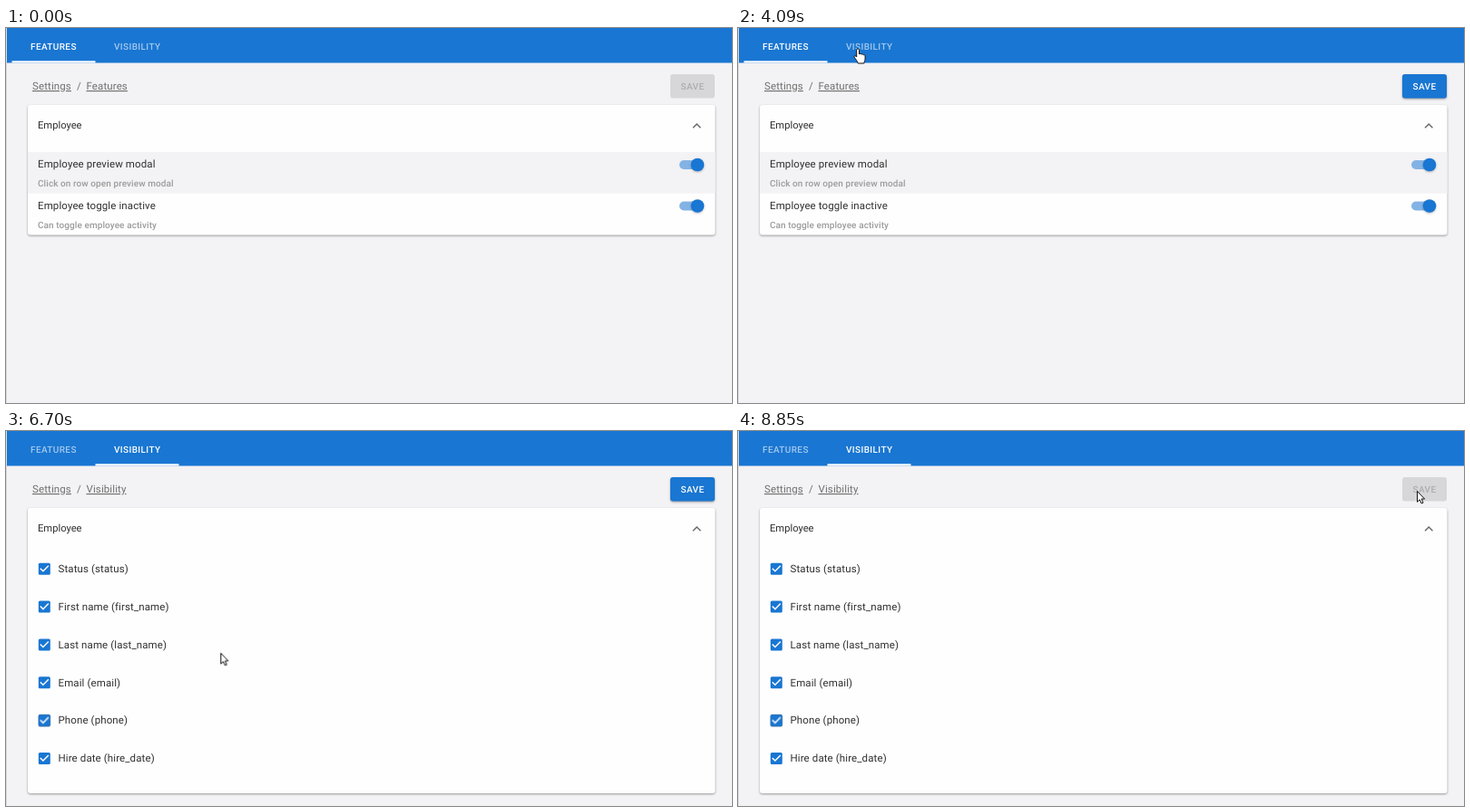
An HTML page for the animation above (9060 ms loop, 800 by 414 pixels).

```html
<!DOCTYPE html>
<html lang="en">
<head>
<meta charset="utf-8">
<title>Settings</title>
<style>
  html, body { margin: 0; width: 100%; height: 100%; overflow: hidden; background: #f3f2f4; }
  svg { display: block; width: 800px; height: 414px; font: 400 11.5px Roboto, sans-serif; letter-spacing: .11px; fill: #303030; text-rendering: geometricPrecision; }
  .blue { fill: #1976d2; }
  .card { fill: #fefefe; filter: drop-shadow(0 1px 1px rgba(0, 0, 0, .38)); }
  .head { font-size: 11.2px; letter-spacing: 0; }
  .sub { font-size: 10px; font-weight: 500; letter-spacing: .08px; fill: #9c9c9c; }
  .crumb { fill: #707070; }
  .link { text-decoration: underline; }
  .caps { font-size: 10px; font-weight: 500; letter-spacing: .38px; fill: #fff; }
  .line { fill: none; stroke: #6a6a6a; stroke-width: 1.45; }
  .tick { fill: none; stroke: #fff; stroke-width: 1.45; }
  .track { fill: #83b3e5; }
  .pointer { fill: #fff; stroke: #111; stroke-width: 1; stroke-linejoin: round; }

  .anim { animation: 9060ms linear infinite both; }
  #features { animation-name: leave; animation-timing-function: step-end; }
  #visibility { animation-name: enter; animation-timing-function: step-end; }
  #tabA { animation-name: dim; }
  #tabB { animation-name: light; }
  #slider { animation-name: slide; }
  #save { animation-name: save; }
  #thumb { animation-name: thumb; }
  #track { animation-name: track; }
  #phone { animation-name: check; animation-timing-function: step-end; }
  #cursor { animation-name: move; }
  #arrow { animation-name: arrow; animation-timing-function: step-end; }
  #hand { animation-name: hand; animation-timing-function: step-end; }

  @keyframes leave { 0% { opacity: 1; } 46.69%, 100% { opacity: 0; } }
  @keyframes enter { 0% { opacity: 0; } 46.69%, 100% { opacity: 1; } }
  @keyframes check { 0% { opacity: 0; } 68.21%, 100% { opacity: 1; } }
  @keyframes dim { 0%, 46.4% { opacity: 1; } 48.5%, 100% { opacity: .6; } }
  @keyframes light { 0%, 46.4% { opacity: .6; } 48.5%, 100% { opacity: 1; } }
  @keyframes slide {
    0%, 46.4% { transform: none; animation-timing-function: cubic-bezier(.25, .8, .5, 1); }
    49.7%, 100% { transform: translateX(92px); }
  }
  @keyframes save {
    0%, 24.39% { opacity: 0; }
    26.6%, 88.3% { opacity: 1; }
    90.5%, 100% { opacity: 0; }
  }
  @keyframes thumb {
    0%, 24.39%, 28.48%, 100% { transform: none; fill: #1976d2; }
    26.05%, 26.82% { transform: translateX(-13px); fill: #fff; }
  }
  @keyframes track {
    0%, 24.39%, 28.48%, 100% { fill: #83b3e5; }
    26.05%, 26.82% { fill: #9e9e9e; }
  }
  @keyframes move {
    0%, 9.38% { transform: translate(-12px, 338px); animation-timing-function: cubic-bezier(.35, .1, .65, .9); }
    14.68% { transform: translate(657px, 212px); animation-timing-function: ease-out; }
    19.1% { transform: translate(757px, 162px); animation-timing-function: ease-out; }
    22.08%, 31.13% { transform: translate(757px, 151px); animation-timing-function: ease-in; }
    32.78% { transform: translate(715px, 144px); animation-timing-function: cubic-bezier(.35, .25, .45, 1); }
    40.3%, 50.8% { transform: translate(132px, 23px); animation-timing-function: ease-in-out; }
    56.51%, 58.17% { transform: translate(98px, 230px); animation-timing-function: cubic-bezier(.4, 0, .8, .8); }
    65.56% { transform: translate(67px, 296px); animation-timing-function: ease-out; }
    67.22%, 70.6% { transform: translate(40px, 315px); animation-timing-function: cubic-bezier(.4, 0, .7, .85); }
    77.92% { transform: translate(624px, 106px); }
    80.9% { transform: translate(730px, 77px); animation-timing-function: ease-out; }
    83.9%, 100% { transform: translate(748px, 66px); }
  }
  @keyframes arrow {
    0%, 31.8%, 52.6%, 73%, 88.3%, 100% { opacity: 1; }
    17.6%, 39%, 66.4%, 81.2% { opacity: 0; }
  }
  @keyframes hand {
    0%, 31.8%, 52.6%, 73%, 88.3%, 100% { opacity: 0; }
    17.6%, 39%, 66.4%, 81.2% { opacity: 1; }
  }
</style>
</head>
<body>
<svg viewBox="0 0 800 414">
  <defs>
    <rect id="box" x="-6.5" y="-6.5" width="13" height="13" rx="1.5"/>
    <g id="checked">
      <use href="#box" class="blue"/>
      <path class="tick" d="M-4.5-.5-1.4 2.6 4.5-3.4"/>
    </g>
  </defs>

  <rect width="800" height="414" fill="#f3f2f4"/>
  <rect class="blue" width="800" height="38.5"/>
  <rect width="1" height="414" fill="#d9dadd"/>
  <g class="caps">
    <text id="tabA" class="anim" x="27" y="24">FEATURES</text>
    <text id="tabB" class="anim" x="119" y="24">VISIBILITY</text>
  </g>
  <rect id="slider" class="anim" x="6.5" y="36.3" width="92" height="2.2" style="fill:#fff"/>

  <g class="crumb">
    <text class="link" x="29" y="68">Settings</text>
    <text x="78" y="68">/</text>
  </g>

  <rect x="732" y="51" width="49" height="26.5" rx="3" fill="#d7d6d8"/>
  <text class="caps" x="743.5" y="67.5" style="fill:#adacae">SAVE</text>
  <g id="save" class="anim">
    <rect class="blue" x="732" y="51" width="49" height="26.5" rx="3" style="filter:drop-shadow(0 1px 1px rgba(0,0,0,.35))"/>
    <text class="caps" x="743.5" y="67.5">SAVE</text>
  </g>

  <g id="features" class="anim">
    <text class="crumb link" x="88.5" y="68">Features</text>
    <rect class="card" x="24" y="85" width="757.5" height="143.5" rx="3"/>
    <rect x="24" y="137" width="757.5" height="45.5" fill="#f3f2f4"/>
    <text x="35" y="154.3">Employee preview modal</text>
    <text class="sub" x="35" y="175">Click on row open preview modal</text>
    <text x="35" y="199.8">Employee toggle inactive</text>
    <text class="sub" x="35" y="220.5">Can toggle employee activity</text>
    <rect id="track" class="track anim" x="742" y="146" width="26" height="10" rx="5"/>
    <g style="filter:drop-shadow(0 1px 1px rgba(0,0,0,.25))">
      <circle id="thumb" class="blue anim" cx="762" cy="151" r="7.3"/>
    </g>
    <rect class="track" x="742" y="191.5" width="26" height="10" rx="5"/>
    <circle class="blue" cx="762" cy="196.5" r="7.3" style="filter:drop-shadow(0 1px 1px rgba(0,0,0,.25))"/>
  </g>

  <g id="visibility" class="anim">
    <text class="crumb link" x="88.5" y="68">Visibility</text>
    <rect class="card" x="24" y="85" width="757.5" height="315" rx="3"/>
    <use href="#checked" x="42.3" y="152.2"/>
    <use href="#checked" x="42.3" y="194"/>
    <use href="#checked" x="42.3" y="235.9"/>
    <use href="#checked" x="42.3" y="277.7"/>
    <rect class="line" x="36.5" y="313.8" width="11.6" height="11.6" rx="1"/>
    <use id="phone" class="anim" href="#checked" x="42.3" y="319.6"/>
    <use href="#checked" x="42.3" y="361.4"/>
    <text x="57.5" y="156">Status (status)</text>
    <text x="57.5" y="197.8">First name (first_name)</text>
    <text x="57.5" y="239.7">Last name (last_name)</text>
    <text x="57.5" y="281.5">Email (email)</text>
    <text x="57.5" y="323.3">Phone (phone)</text>
    <text x="57.5" y="365.2">Hire date (hire_date)</text>
  </g>

  <text class="head" x="35" y="111.2">Employee</text>
  <path class="line" d="M757 110.2l4.2-4.2 4.2 4.2"/>

  <g id="cursor" class="pointer anim">
    <path id="arrow" class="anim" d="M.5.5V12.3l2.7-2.5 1.9 4.2 1.9-.8L5.2 9H8.6z"/>
    <path id="hand" class="anim" d="M-1.3 9V1.2a1.4 1.4 0 0 1 2.8 0V6c.3-1 2.4-.9 2.6.3.5-.8 2.2-.6 2.3.6.6-.6 1.7-.2 1.7 1V11c0 2-1 2.8-1.2 5H.2C-.4 13.5-2.6 11.3-3.8 9.2c-.8-1.5 1-2.4 2.5-.2z"/>
  </g>
</svg>
</body>
</html>
```
